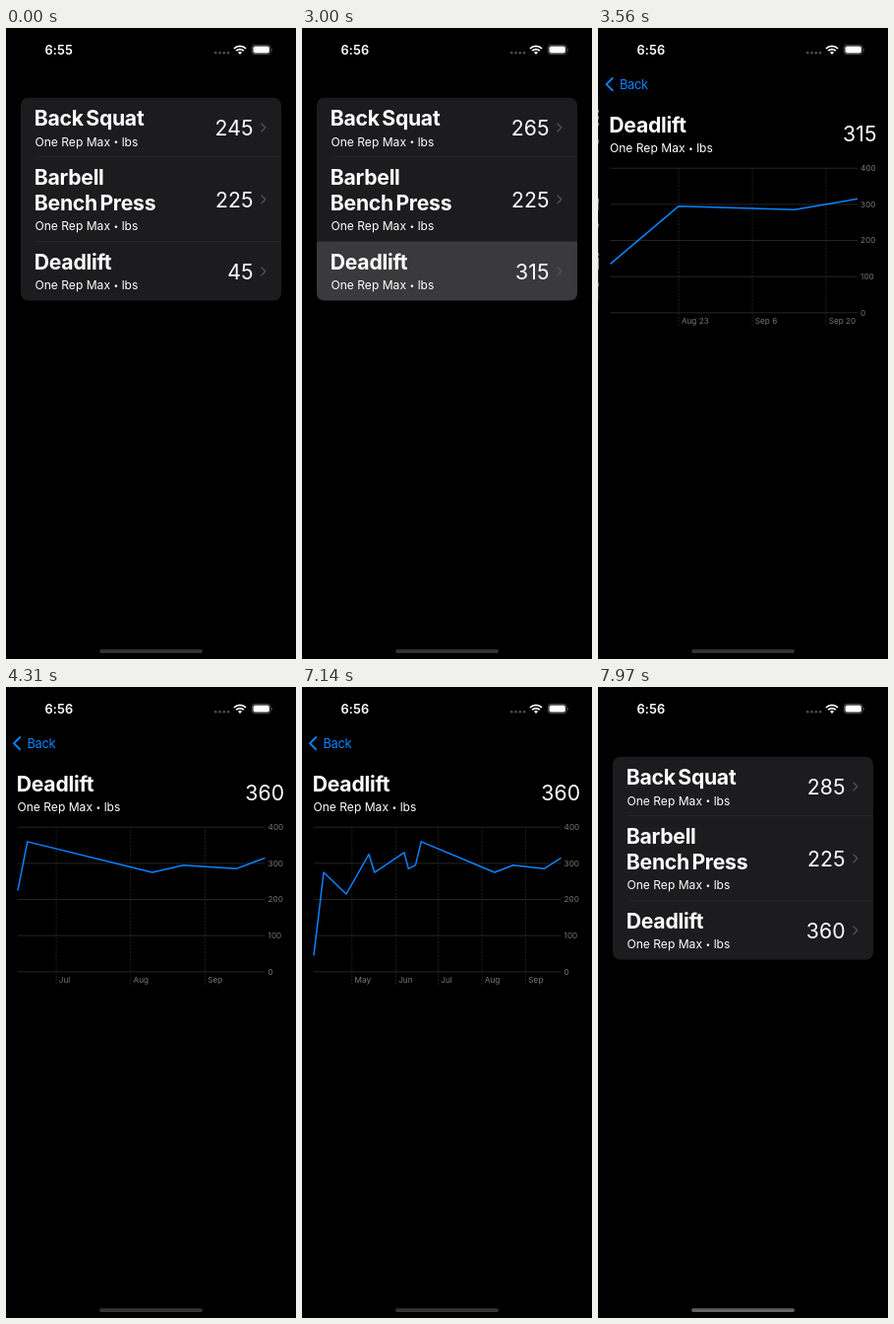
An HTML page for the animation above (8 s loop, 295x640 px).

```html
<!DOCTYPE html>
<html lang="en">
<head>
<meta charset="utf-8">
<title>One rep max tracker</title>
<style>
  html, body { margin: 0; width: 100%; height: 100%; overflow: hidden; background: #000; }
  svg { display: block; width: 100vw; height: 100vh; }
  text { font-family: Inter, Roboto, sans-serif; fill: #fff; }
  .title { font-size: 21.2px; font-weight: 700; letter-spacing: -.28px; word-spacing: -2.2px; }
  .sub { font-size: 12.1px; }
  .bullet { font-size: 8.6px; }
  .value { font-size: 21.2px; text-anchor: end; letter-spacing: .15px; }
  .clock { font-size: 12.86px; font-weight: 600; letter-spacing: .1px; }
  .axis { font-size: 8.2px; fill: #77777b; }
  .line { fill: none; stroke: #0a84ff; stroke-width: 1.5; stroke-linejoin: round; }
  .grid { stroke: #2f2f31; stroke-width: .8; }
  .dash { stroke: #2b2b2d; stroke-dasharray: 2 1.5; }
  .chevron { fill: none; stroke: #505053; stroke-width: 1.4; stroke-linecap: round; stroke-linejoin: round; }
  .back path { fill: none; stroke: #0a84ff; stroke-width: 1.9; stroke-linecap: round; stroke-linejoin: round; }
  .back text { fill: #0a84ff; font-size: 12.86px; letter-spacing: -.3px; }
  .wifi { fill: none; stroke: #fff; stroke-width: 1.8; }
</style>
</head>
<body>
<svg viewBox="0 0 295 640" preserveAspectRatio="none">
  <defs><clipPath id="card"><rect x="15" y="70.8" width="265" height="205.7" rx="7.5"/></clipPath></defs>
  <rect width="295" height="640"/>

  <g id="list">
    <g clip-path="url(#card)">
      <rect x="15" y="70" width="265" height="207" fill="#1c1c1e"/>
      <rect id="pressed" x="15" y="216.5" width="265" height="60" fill="#3a3a3c"/>
      <path d="M30 130.5H280M30 216.5H280" stroke="#29292b" stroke-width=".8"/>
    </g>
    <g id="rows"></g>
  </g>

  <g id="detail">
    <rect width="295" height="640"/>
    <g class="back" id="back">
      <path d="M14.2 51L8 57.1L14.2 63.2"/>
      <text x="21.4" y="61.6">Back</text>
    </g>
    <g id="heading"></g>
    <g id="chart"></g>
  </g>

  <text class="clock" id="clock" x="39.4" y="26.6"></text>
  <g fill="#48484a">
    <circle cx="213.2" cy="25.2" r="1.4"/><circle cx="217.5" cy="25.2" r="1.4"/>
    <circle cx="221.8" cy="25.2" r="1.4"/><circle cx="226.1" cy="25.2" r="1.4"/>
  </g>
  <g class="wifi">
    <path d="M232 20.8A8.6 8.6 0 0 1 244 20.8"/>
    <path d="M234.2 23.2A5.4 5.4 0 0 1 241.8 23.2"/>
    <path d="M236 24.8A2.8 2.8 0 0 1 240 24.8L238 27Z" fill="#fff" stroke="none"/>
  </g>
  <rect x="250.3" y="17.3" width="18.8" height="9.4" rx="2.8" fill="none" stroke="#666669" stroke-width=".8"/>
  <rect x="251.5" y="18.5" width="16.4" height="7" rx="1.8" fill="#fff"/>
  <path d="M270.3 20.4a2 2 0 0 1 0 3.2z" fill="#666669"/>
  <rect id="home" x="95" y="630.2" width="105" height="3.8" rx="1.9"/>
</svg>
<script>
const LOOP = 8000, W = 295;
const $ = id => document.getElementById(id);

// Moments at which the sliding pages advance.
const TICKS = [0, 3000, 3120, 3230, 3340, 3450, 3560, 3940, 7290, 7440, 7550, 7650, 7760, 7870, 7970];

// [days before today, best lift]
const LIFTS = [[168, 275], [152, 215], [136, 325], [132, 275], [111, 330], [108, 285],
  [103, 295], [99, 360], [47, 275], [34, 295], [12, 285], [0, 315]];
// [start time, days shown, lift at the left edge]
const RANGES = [[0, 47, 135], [4310, 103, 225], [5640, 132, 245], [6140, 152, 135], [7140, 175, 45]];
const WEEKS = [[34, 'Aug 23'], [20, 'Sep 6'], [6, 'Sep 20']];
const MONTHS = [[148, 'May'], [117, 'Jun'], [87, 'Jul'], [56, 'Aug'], [25, 'Sep']];

const SQUAT = [[0, 245], [320, 255], [1230, 265], [7440, 285]];
const DEAD = [[0, 45], [860, 315], [7440, 360]];
const BENCH = [[0, 225]];
const UNIT = 'One Rep Max <tspan class="bullet" dy="-1.1">•</tspan><tspan dy="1.1"> lbs</tspan>';

const latest = (steps, t) => steps.filter(s => s[0] <= t).pop();
const text = (cls, x, y, s, id = '') => `<text class="${cls}" x="${x}" y="${y}" id="${id}">${s}</text>`;

function row(id, top, height, lines) {
  const mid = top + height / 2 + .3;
  const titles = lines.map((s, i) => text('title', 28.8, top + 28.4 + i * 25.7, s)).join('');
  return titles
    + text('sub', 29.4, top + 48.7 + (lines.length - 1) * 25.7, UNIT)
    + text('value', 251.8, mid + 7.7, '', id)
    + `<path class="chevron" d="M260 ${mid - 3.9}l3.9 3.9l-3.9 3.9"/>`;
}
$('rows').innerHTML = row('squat', 70.8, 59.7, ['Back Squat'])
  + row('bench', 130.5, 86, ['Barbell', 'Bench Press'])
  + row('dead', 216.5, 60, ['Deadlift']);
$('heading').innerHTML = text('title', 10.8, 106, 'Deadlift')
  + text('sub', 11.4, 126, UNIT)
  + text('value', 283.2, 115, '', 'best');

function chart([, days, first]) {
  const left = 12, right = 263.5;
  const x = d => right - d * (right - left) / days;
  const y = v => 288.8 - v * .3665;
  let out = '';
  for (let v = 0; v <= 400; v += 100)
    out += `<path class="grid" d="M${left} ${y(v)}H${right}"/>` + text('axis', 266.6, y(v) + 2.9, v);
  for (const [d, name] of days < 60 ? WEEKS : MONTHS)
    if (d < days)
      out += `<path class="grid dash" d="M${x(d)} 142.2V302"/>` + text('axis', x(d) + 2.8, 299.8, name);
  const points = [[days, first], ...LIFTS.filter(p => p[0] < days)];
  out += `<polyline class="line" points="${points.map(([d, v]) => x(d) + ',' + y(v)).join(' ')}"/>`;
  $('chart').innerHTML = out;
  $('best').textContent = Math.max(...points.map(p => p[1]));
}

// Critically damped spring: the part of the way still to go.
function remaining(ms) {
  const s = Math.max(0, ms) * .0165;
  return (1 + s) * Math.exp(-s);
}

let shown;
function draw(t) {
  const tick = TICKS.filter(k => k <= t).pop();
  const leaving = tick >= 7440;
  let away = leaving ? 1 - remaining(tick - 7430) : remaining(tick - 3039);
  if (tick >= 7970) away = 1;
  if (tick >= 3940 && !leaving) away = 0;

  $('detail').setAttribute('transform', `translate(${away * W})`);
  $('list').setAttribute('transform', `translate(${(away - 1) * W * .3})`);
  $('pressed').setAttribute('opacity', tick < 3000 ? 0 : leaving ? 1 - away : 1);
  $('back').setAttribute('opacity', tick >= 7290 ? .72 : 1);
  $('home').setAttribute('fill', leaving ? '#626262' : '#343434');

  $('clock').textContent = t < 2190 ? '6:55' : '6:56';
  $('squat').textContent = latest(SQUAT, t)[1];
  $('bench').textContent = latest(BENCH, t)[1];
  $('dead').textContent = latest(DEAD, t)[1];

  const range = latest(RANGES, t);
  if (range !== shown) chart(shown = range);
}

const start = performance.now();
function loop() {
  draw((performance.now() - start) % LOOP);
  requestAnimationFrame(loop);
}
loop();
</script>
</body>
</html>
```
